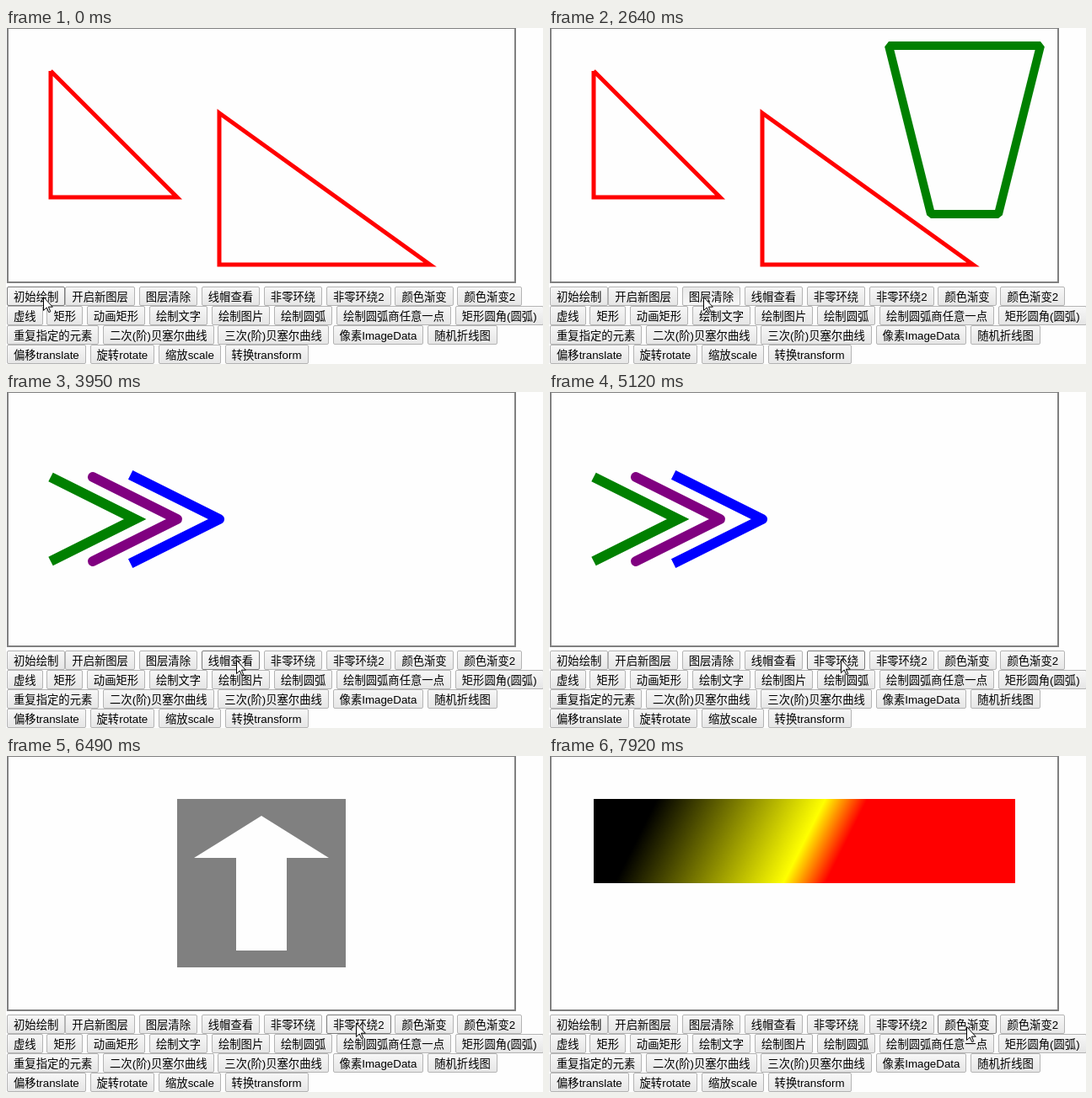
Write an HTML page that moves like this. It is 637 px wide and 399 px high and loops after 8000 ms.

```html
<!DOCTYPE html>
<html lang="zh">
<head>
<meta charset="utf-8">
<style>
html, body { margin: 0; width: 100%; height: 100%; overflow: hidden; background: #fefefe; }
svg { position: absolute; left: 0; top: 0; }
#panel { position: absolute; left: 1px; top: 307px; }
.row { display: flex; gap: 4.75px; height: 23px; }
.row span {
  flex: none; box-sizing: border-box; height: 23px; padding: 0 7px;
  border: 1px solid #b4b4b4; border-radius: 2px;
  background: linear-gradient(#f7f7f7, #e6e6e6);
  font: 13.333px/23px "Liberation Sans", "Noto Sans CJK SC", "Noto Sans CJK", sans-serif;
  color: #000; white-space: nowrap;
}
.row:first-child span:nth-child(2) { margin-left: -4.75px; }
.row .hover { border-color: #7c7c7c; background: linear-gradient(#f9f9f9, #eaeaea); }
.row .pressed { background: linear-gradient(#eaeaea, #f7f7f7); }
</style>
</head>
<body>
<svg width="637" height="305" fill="none">
  <defs>
    <linearGradient id="blend" gradientUnits="userSpaceOnUse" x1="100" y1="100" x2="300" y2="200">
      <stop stop-color="#000"/><stop offset=".8" stop-color="#ff0"/><stop offset="1" stop-color="red"/>
    </linearGradient>
  </defs>
  <rect x="2" width="602" height="302" stroke="gray" stroke-width="2"/>
  <g transform="translate(3 1)" stroke-miterlimit="10">
    <g data-scenes="01" stroke="red" stroke-width="5">
      <path d="M50 50L200 200H50V50"/>
      <path d="M250 100L500 280H250Z"/>
    </g>
    <path data-scenes="1" d="M400 20H580L530 220H450Z" stroke="green" stroke-width="10" stroke-linejoin="bevel"/>
    <g data-scenes="3" stroke-width="12">
      <path d="M50 100l100 50-100 50" stroke="green"/>
      <path d="M100 100l100 50-100 50" stroke="purple" stroke-linecap="round" stroke-linejoin="round"/>
      <path d="M150 100l100 50-100 50" stroke="blue" stroke-linecap="square" stroke-linejoin="round"/>
    </g>
    <path data-scenes="4" d="M200 50h200v200h-200zM250 100h100v100h-100z" fill="#ff0" fill-rule="evenodd"/>
    <path data-scenes="5" d="M200 50h200v200h-200zM300 70l80 50h-50v110h-60v-110h-50z" fill="gray" fill-rule="evenodd"/>
    <rect data-scenes="6" x="50" y="50" width="500" height="100" fill="url(#blend)"/>
  </g>
</svg>
<div id="panel"></div>
<svg id="cursor" width="13" height="20"><path d="M.5 .5v16l3.7-3.5 2.6 5.6 2-.9-2.5-5.5h5z" fill="#fff" stroke="#000"/></svg>
<script>
const LOOP = 8000, HOLD = 135, TICK = 130;
const labels = [
  '初始绘制 开启新图层 图层清除 线帽查看 非零环绕 非零环绕2 颜色渐变 颜色渐变2',
  '虚线 矩形 动画矩形 绘制文字 绘制图片 绘制圆弧 绘制圆弧商任意一点 矩形圆角(圆弧)',
  '重复指定的元素 二次(阶)贝塞尔曲线 三次(阶)贝塞尔曲线 像素ImageData 随机折线图',
  '偏移translate 旋转rotate 缩放scale 转换transform'
];
// Each visit glides to a button, then releases a click that shows the next scene.
const home = { x: 44, y: 319 };
const visits = [
  { go: 370, arrive: 640, click: 1380, x: 105, y: 319, power: 1 },
  { go: 2000, arrive: 2390, click: 2760, x: 183, y: 319, power: 3 },
  { go: 3220, arrive: 3490, click: 3950, x: 273, y: 318, power: 1.2 },
  { go: 4880, arrive: 5120, click: 5520, x: 346, y: 317, power: 1 },
  { go: 5920, arrive: 6190, click: 6490, x: 415, y: 317, power: 4 },
  { go: 7200, arrive: 7680, click: 7920, x: 495, y: 321, power: 1.5 }
];

const panel = document.getElementById('panel');
const cursor = document.getElementById('cursor');
for (const line of labels) {
  const row = panel.appendChild(document.createElement('div'));
  row.className = 'row';
  for (const label of line.split(' ')) {
    row.appendChild(document.createElement('span')).textContent = label;
  }
}
const buttons = [...panel.firstChild.children];
const shapes = [...document.querySelectorAll('[data-scenes]')];

// The pointer eases out towards its stop, in discrete ticks.
function pointerAt(t) {
  let from = home;
  for (const to of visits) {
    if (t < to.go) break;
    if (t < to.arrive) {
      const gaps = Math.round((to.arrive - to.go) / TICK);
      const tick = Math.floor((t - to.go) / (to.arrive - to.go) * gaps) + 1;
      const eased = 1 - (1 - tick / (gaps + 1)) ** to.power;
      const mix = axis => Math.round(from[axis] + (to[axis] - from[axis]) * eased);
      return { x: mix('x'), y: mix('y') };
    }
    from = to;
  }
  return from;
}

function render(t) {
  const scene = visits.filter(visit => visit.click <= t).length;
  for (const shape of shapes) {
    shape.style.display = shape.dataset.scenes.includes(scene) ? '' : 'none';
  }
  const { x, y } = pointerAt(t);
  cursor.style.transform = `translate(${x}px, ${y}px)`;
  const pressed = visits.some(({ click }) => t >= click - HOLD && t < click);
  for (const button of buttons) {
    const offset = x - panel.offsetLeft - button.offsetLeft;
    const over = offset >= 0 && offset < button.offsetWidth;
    button.className = over ? (pressed ? 'pressed' : 'hover') : '';
  }
}

const start = performance.now();
function tick() {
  render((performance.now() - start) % LOOP);
  requestAnimationFrame(tick);
}
tick();
</script>
</body>
</html>
```
